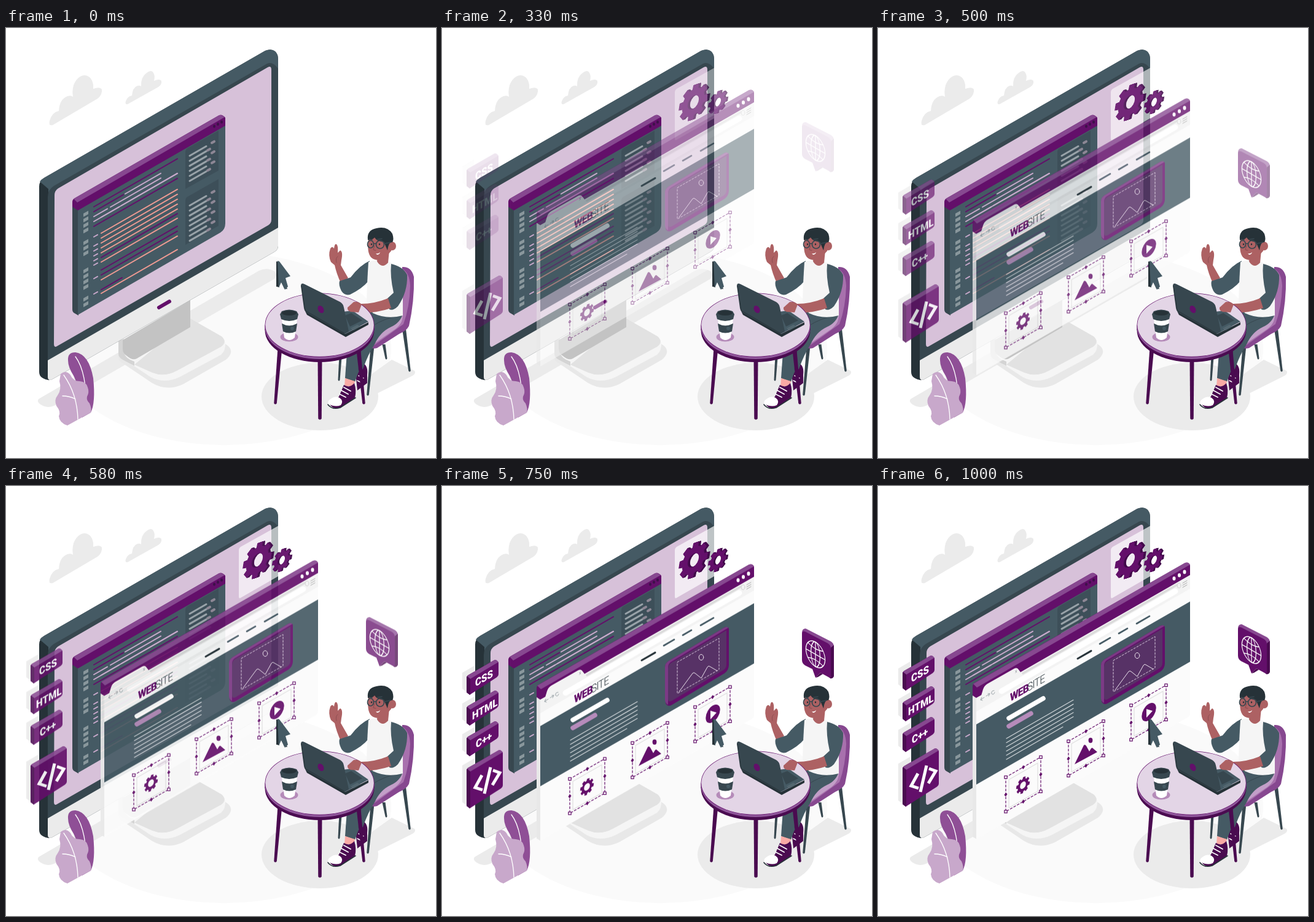
Recreate the animation shown at these times as an HTML page with a canvas. Size 700 by 700 pixels, loop 1040 ms.

```html
<!DOCTYPE html>
<html lang="en">
<head>
<meta charset="utf-8">
<title>Building a website</title>
<style>
html, body { margin: 0; width: 100%; height: 100%; overflow: hidden; background: #fff; }
canvas { display: block; width: 700px; height: 700px; }
</style>
</head>
<body>
<canvas id="stage"></canvas>
<script>
const SIZE = 700, LOOP = 1040, STEP = 41.6;
const DPR = window.devicePixelRatio || 1;
const PLUM = '#630f6a', DEEP = '#4a0b50', MAUVE = '#874890', LILAC = '#c8a8cb', PALE = '#d7c1d9';
const SLATE = '#455a64', DARK = '#37474f', INK = '#263238', MIST = '#ebebeb', SKIN = '#ad6163', CREASE = '#874a4f';
const SLOPE = 0.575;
let g;

function setup(canvas) {
  canvas.width = canvas.height = SIZE * DPR;
  const c = canvas.getContext('2d');
  c.scale(DPR, DPR);
  c.lineCap = c.lineJoin = 'round';
  return c;
}

function layer(draw) {
  const canvas = document.createElement('canvas');
  g = setup(canvas);
  draw();
  return canvas;
}

function fill(color, path) {
  g.fillStyle = color;
  g.fill(new Path2D(path));
}

function stroke(color, width, path, dash = []) {
  g.strokeStyle = color;
  g.lineWidth = width;
  g.setLineDash(dash);
  g.stroke(new Path2D(path));
  g.setLineDash([]);
}

// Line running up along the isometric axis
function bar(x, y, dx, width, color) {
  stroke(color, width, `M${x} ${y}L${x + dx} ${y - dx * SLOPE}`);
}

// Tapered furniture leg
function leg(color, x1, y1, w1, x2, y2, w2) {
  fill(color, `M${x1 - w1 / 2} ${y1}H${x1 + w1 / 2}L${x2 + w2 / 2} ${y2}Q${x2} ${y2 + 3} ${x2 - w2 / 2} ${y2}Z`);
}

function oval(color, x, y, rx, ry, width) {
  g.beginPath();
  g.ellipse(x, y, rx, ry, 0, 0, 7);
  g.fillStyle = g.strokeStyle = color;
  g.lineWidth = width || 1;
  width ? g.stroke() : g.fill();
}

function iso(x, y, draw, dir = -1) {
  g.save();
  g.transform(0.866, 0.5 * dir, 0, 1, x, y);
  draw();
  g.restore();
}

function gear(x, y, r, teeth, hole, color) {
  iso(x, y, () => {
    g.beginPath();
    for (let i = 0; i < teeth; i++) {
      [[-0.34, 0.77], [-0.24, 1], [0.24, 1], [0.34, 0.77]].forEach(([a, k]) => {
        const q = (i + a) / teeth * Math.PI * 2 + 0.2;
        g.lineTo(Math.cos(q) * r * k, Math.sin(q) * r * k);
      });
    }
    g.closePath();
    g.moveTo(hole, 0);
    g.arc(0, 0, hole, 0, 7);
    g.fillStyle = color;
    g.fill('evenodd');
  });
}

function solidGear(x, y, r, hole, depth) {
  for (let d = depth; d > 0; d -= 0.5) gear(x + d, y - d * 0.3, r, 8, hole, '#430b4c');
  gear(x, y, r, 8, hole, PLUM);
}

function text(str, x, y, size, weight, color, gap = 0) {
  iso(x, y, () => {
    g.font = `${weight} ${size}px Roboto, Arial, sans-serif`;
    g.letterSpacing = gap + 'px';
    g.fillStyle = color;
    g.fillText(str, 0, 0);
  });
}

/* ---- scenery ---- */

function drawFloor() {
  g.fillStyle = '#fff';
  g.fillRect(0, 0, SIZE, SIZE);
  oval('#fafafa', 355, 522, 272, 157);
  fill(MIST, 'M76 158Q69 160 71 151Q75 137 86 135Q87 116 100 111Q106 109 109 112Q106 92 118 81Q128 73 137 81Q143 88 142 99Q153 95 156 100Q157 109 149 115Z');
  fill(MIST, 'M198 124Q193 125 195 119Q198 111 205 110Q206 97 214 94Q218 93 220 95Q219 80 229 73Q237 67 240 73Q243 78 241 86Q250 82 253 86Q254 92 248 96Z');
  fill(MIST, 'M53 604L412 395Q425 389 437 396Q444 402 436 409L78 615Q66 620 55 612Q50 608 53 604');
  oval(MIST, 511, 600, 95, 55);
  fill(MIST, 'M560 590L600 560L628 540L665 558Q668 562 662 566L598 598Z');
}

function drawStand() {
  fill('#e8e8e8', 'M183 508V535Q183 541 189 545L238 578Q262 592 288 580L358 540Q372 528 362 518L330 495Z');
  fill('#f5f5f5', 'M190 510V538L235 568Q258 580 283 568L350 532Q358 525 357 512L300 480Z');
  fill('#e2e2e2', 'M209 548L238 561Q258 569 278 558L350 519Q361 511 351 502L300 473Z');
  fill('#d4d4d4', 'M183 510L192 506V528Q194 538 209 543V550L190 540Q183 536 183 530Z');
  fill('#c3c3c3', 'M190 508L300 443V487L213 538Q206 542 197 534Q190 530 190 522Z');
}

function drawMonitor() {
  fill(INK, 'M54 258Q54 249 62 244L422 37Q432 33 438 38Q443 42 443 52V355Q443 361 436 365L75 572Q68 575 60 570Q54 567 54 560Z');
  fill(SLATE, 'M55 250Q58 246 62 244L422 37Q432 33 438 38Q443 42 443 52V70L69 282V262Z');
  fill(DARK, 'M68 275Q68 263 78 257L425 58Q434 54 443 66V340L68 556Z');
  fill(PALE, 'M79 272Q79 265 85 261L426 64Q432 61 432 68V312Q432 318 427 321L83 518Q78 521 78 514Z');
  fill(MIST, 'M68 541L443 325V355Q443 361 436 365L75 572Q68 575 68 568Z');
  bar(249, 455, 17, 6, PLUM);
}

function drawCode() {
  fill(DARK, 'M108 288L118 296V468L111 464Q108 462 108 458Z');
  fill(SLATE, 'M117 296L357 158V318Q357 328 349 333L117 467Z');
  fill(PLUM, 'M108 283Q108 279 112 277L347 142Q352 140 357 146V159L117 297L108 291Z');
  fill(MAUVE, 'M110 278L347 142Q351 141 356 145L116 284Z');
  [339, 345, 351].forEach((x, i) => oval('#3c1148', x, 160 - i * 3.5, 2, 2.6));

  fill('#3d4f59', 'M292 201Q292 198 295 196L346 167V232L292 262Z');
  fill('#3d4f59', 'M292 280Q292 277 295 275L346 246V322L292 353Z');
  const list = (y, n) => {
    for (let i = 0; i < n; i++) {
      bar(299, y + i * 8.2, 27, 3, '#98a2a8');
      bar(i % 2 ? 328 : 335, y - (i % 2 ? 17 : 21) + i * 8.2, 4, 4, '#8d8795');
    }
  };
  list(208, 6);
  list(289, 8);

  [302, 311, 320, 329, 348, 357, 366, 394, 403, 412, 421, 440, 449].forEach(y =>
    fill('#89979c', `M126 ${y}L134 ${y - 4.6}V${y + 1}L126 ${y + 5.5}Z`));

  bar(143, 291, 136, 2, PLUM);
  bar(143, 299, 48, 2, PLUM);
  bar(194, 270, 58, 2, LILAC);
  bar(143, 307, 22, 2, LILAC);
  bar(170, 291.5, 82, 2, LILAC);
  bar(143, 315, 41, 2, LILAC);
  bar(188, 289, 91, 2, LILAC);
  bar(155, 308, 124, 2, LILAC);
  bar(143, 323, 136, 2, PLUM);

  const pink = '#ef9a92';
  [334, 342, 350, 358, 366, 381, 410, 432].forEach(y => bar(155, y, 124, 2, pink));
  [373.5, 394, 402].forEach(y => bar(155, y, 124, 2, PLUM));
  bar(155, 426, 34, 2, PLUM);
  [340, 355, 363, 371, 379, 386, 408, 433].forEach(y => bar(143, y, 6, 2, LILAC));
}

/* ---- floating parts ---- */

function drawGears() {
  fill('rgba(255,255,255,.68)', 'M379 105Q379 101 382 99L443 65V147L382 182Q379 184 379 180Z');
  solidGear(409, 121, 27.5, 10.5, 4);
  solidGear(448, 121, 17.5, 7, 3);
}

function frameBox(x, y) {
  const w = 57, h = 56, d = w * SLOPE;
  stroke('#e0e0e0', 1.2, `M${x + 5} ${y + 4}L${x + 52} ${y - 23}v46L${x + 5} ${y + 50}Z`);
  stroke(PLUM, 1.2, `M${x} ${y}l${w} ${-d}v${h}l${-w} ${d}Z`, [3.5, 3]);
  [[0, 0], [w, -d], [w, h - d], [0, h]].forEach(([a, b]) => {
    g.fillStyle = '#fff';
    g.fillRect(x + a - 2.2, y + b - 2.2, 4.4, 4.4);
    g.strokeStyle = PLUM;
    g.strokeRect(x + a - 2.2, y + b - 2.2, 4.4, 4.4);
  });
  [[w / 2, -d / 2], [w, h / 2 - d], [w / 2, h - d / 2], [0, h / 2]].forEach(([a, b]) =>
    fill(PLUM, `M${x + a - 2.6} ${y + b + 1}l2.6 -4 2.6 2.4 -2.6 4Z`));
}

function drawSite() {
  fill('#e8e8e8', 'M154 336L161 342V575L154 571Z');
  fill('#fbfbfb', 'M160 343L508 146V371Q508 374 505 376L160 575Z');
  fill(SLATE, 'M160 388L508 188V286L160 486Z');
  fill(PLUM, 'M154 327Q154 322 158 320L500 125Q506 123 508 129V145L160 345L154 341Z');
  fill(MAUVE, 'M155 322L500 125Q505 124 508 128L161 328Z');
  fill('#f3f3f3', 'M160 345L168 341L171 331Q173 325 178 322L222 297Q227 295 229 299L232 303L508 145V167L160 367Z');
  bar(201, 334, 283, 9, '#fff');
  bar(236, 305, 250, 3.5, '#dcdcdc');
  [482, 490.5, 499].forEach((x, i) => oval('#fff', x, 150.5 - i * 5.3, 2.5, 3.3));
  text('x', 223, 305, 8, 400, '#8d979c');
  stroke('#9aa3a8', 1, 'M173 344L167 348M169 344L167 348L170 349M176 342L182 338M179 338L182 338L180 342');
  stroke('#9aa3a8', 1, 'M189 333Q184 333 185 338Q188 341 190 336');
  oval('#d2d2d2', 490, 162, 3, 4, 1);
  for (let i = 0; i < 3; i++) bar(496, 158 + i * 3.5, 7, 1, '#aaa');

  text('WEB', 215, 351, 18, 900, PLUM, -0.9);
  text('SITE', 243, 335, 18, 300, INK, -0.9);
  bar(325, 281, 22, 3, INK);
  bar(361, 257, 17, 2.6, SLATE);
  bar(392, 240, 14, 2.6, SLATE);
  bar(421, 224, 21, 2.6, SLATE);

  bar(213, 378, 56, 7.5, '#fff');
  bar(213, 391, 36, 7.5, '#b68bbb');
  for (let i = 0; i < 6; i++) bar(209, 411 + i * 6.8, i < 5 ? 109 : 92, 1.2, '#d5dadd');

  fill(PLUM, 'M363 293Q363 286 369 282L459 228Q464 225 467 229V288Q467 297 460 302L375 353Q368 358 364 351Z');
  fill('#7c3a85', 'M363 292Q363 286 369 282L459 228Q464 225 466 228L372 284Q368 287 368 293V353Q364 352 363 346Z');
  fill('#573266', 'M368 294Q368 288 373 285L463 232V288Q463 294 458 297L374 347Q368 350 368 344Z');
  stroke('#d9c9dd', 1, 'M383 284L451 245V296L383 335Z', [3, 2.5]);
  oval('#f0e8f1', 422, 276, 3.8, 4.6, 1);
  stroke('#f0e8f1', 1, 'M386 332L408 302Q410 300 412 302L422 310L432 292Q434 289 436 291L448 298');

  [0, 1, 2].forEach(i => frameBox(208 + i * 102, 474 - i * 58.5));
  gear(236, 487, 13, 8, 5.5, PLUM);
  fill(PLUM, 'M320 453L335 422Q337 420 339 423L344 432L347 427Q349 425 351 428L357 433Z');
  oval(PLUM, 346, 414, 3.4, 4.2);
  iso(441, 368, () => oval(PLUM, 0, 0, 13.5, 13.5));
  fill('#fff', 'M437 363L447 366L437 377Z');
}

function tag(y, h, w) {
  const r = 40 + w, top = y - (w - 6) * SLOPE;
  fill(MIST, `M33 ${y - 6}L52 ${y - 17}V${y + h - 6}L40 ${y + h + 2}L33 ${y + h - 3}Z`);
  fill(PLUM, `M40 ${y + 2}Q40 ${y - 1} 44 ${y - 3}L${r - 7} ${top}Q${r - 4} ${top - 2} ${r} ${top + 4}V${top + h}Q${r} ${top + h + 3} ${r - 3} ${top + h + 5}L45 ${y + h + 7}L40 ${y + h + 3}Z`);
  fill(MAUVE, `M41 ${y - 1}L${r - 7} ${top}Q${r - 4} ${top - 2} ${r} ${top + 3}L46 ${y + 4}Z`);
  fill(DEEP, `M40 ${y}L46 ${y + 4}V${y + h + 7}L40 ${y + h + 3}Z`);
}

function drawTags() {
  ['CSS', 'HTML', 'C++'].forEach((name, i) => {
    tag(303 + i * 50, 23, 52);
    text(name, [54, 49, 55][i], [320, 374, 420][i], 17.5, 900, '#fff');
  });
}

function drawBracket() {
  tag(458, 57, 59);
  g.lineCap = 'butt';
  g.lineJoin = 'miter';
  stroke('#fff', 5, 'M65 468L54 488L66 492M83 460L94 464L82 484M79 455L69 498');
}

function drawGlobe() {
  fill(MAUVE, 'M586 232Q586 225 592 225L633 246Q638 249 638 255V302Q637 307 632 306L600 280Z');
  fill(PLUM, 'M586 234Q586 228 591 230L628 249Q633 252 633 258V302Q633 307 629 304L616 297L608 305L603 291L591 285Q586 282 586 276Z');
  fill(DEEP, 'M633 256L638 252V302Q637 307 631 306Q633 305 633 301ZM608 305L616 297L620 299L612 304Z');
  iso(608, 267, () => {
    oval('#fff', 0, 0, 18, 20, 1.4);
    oval('#fff', 0, 0, 8.5, 20, 1.4);
    stroke('#fff', 1.4, 'M-18 0H18M0 -20V20M-14 -12Q0 -6 14 -12M-14 12Q0 6 14 12');
  }, 1);
}

/* ---- foreground ---- */

function drawPlant() {
  fill('#8f4f96', 'M101 541Q100 528 113 528Q135 531 142 570Q146 610 138 626L124 634Q122 590 110 566Q101 552 101 541Z');
  stroke('#fff', 1.3, 'M113 535Q132 560 131 626');
  fill(LILAC, 'M89 563Q98 556 105 565Q109 575 120 575Q131 576 133 585Q136 593 132 600Q130 605 136 611Q140 620 138 626L100 647Q87 643 86 632Q90 625 82 615Q78 605 84 598Q91 588 87 575Z');
  stroke('#fff', 1.3, 'M94 565Q116 596 117 637M92 599Q103 599 113 604');
}

function drawChair() {
  leg(DARK, 546, 512, 5, 542, 573, 3);
  leg(DARK, 615, 515, 5, 619, 538, 3);
  leg(DARK, 648, 490, 6, 657, 558, 3.5);
  leg(DARK, 597, 513, 6, 589, 597, 3.5);
  fill(MAUVE, 'M645 389Q660 388 664 405Q665 445 656 485Q652 493 640 498L604 521Q592 524 588 514L600 495L640 470Z');
  fill('#a871ad', 'M645 392Q657 398 658 420Q657 455 647 482L600 516Q590 518 590 508L640 465Z');
  fill('#c39fc8', 'M590 509L645 462Q649 478 634 490L602 512Q594 516 590 509Z');
}

function drawMan() {
  // legs and shoes
  fill(DEEP, 'M569 562L580 545Q590 549 588 565V578L572 590Z');
  stroke('#fff', 1.5, 'M574 566L582 570M572 574L580 578');
  fill(SLATE, 'M594 460L646 465Q642 480 626 487Q609 495 600 515Q590 530 581 555L572 562L556 535L560 495Z');
  fill(SLATE, 'M555 528L552 570L568 576L584 532Z');
  stroke(DARK, 1, 'M630 470Q604 478 587 492Q576 520 574 556');
  fill('#f9aaa5', 'M552 570L568 575L566 583L551 583Z');
  fill(DEEP, 'M550 581Q560 587 567 578Q571 590 568 602L545 618Q532 622 527 612L542 600Z');
  fill('#fff', 'M527 605Q536 598 543 602Q550 607 545 614Q536 618 525 612Q523 608 527 605Z');
  stroke(INK, 1.6, 'M524 613Q531 622 544 618L569 602');
  stroke('#fff', 1.8, 'M543 596L553 601M546 590L557 596M550 585L561 591');

  // raised arm
  fill(SKIN, 'M529 381Q524 370 528 359Q531 354 534 359Q535 350 538 352Q541 354 540 366L544 362Q549 364 546 378L545 386L557 407L545 415Q538 400 535 386Z');
  stroke(CREASE, 0.8, 'M538 382Q536 374 540 372');
  fill(SLATE, 'M592 379Q576 386 561 406L543 412Q541 418 546 428Q551 436 560 434Q580 424 589 413Z');

  // torso and neck
  fill('#f5f5f5', 'M590 381Q607 374 631 384L646 400L646 468Q620 475 597 464L587 445Q588 410 590 381Z');
  fill(SKIN, 'M605 370L624 362L622 382Q612 393 604 380Z');
  fill(SLATE, 'M627 384Q646 388 653 402Q654 430 638 453Q630 461 624 458L620 441L631 431Q625 405 627 384Z');
  fill(SKIN, 'M622 440L627 456Q600 465 575 463L561 462Q553 459 557 453L565 446Q570 443 578 449Q600 449 622 440Z');
  stroke(CREASE, 0.8, 'M570 452L562 453M572 459L562 459');

  // head
  fill(SKIN, 'M590 342Q587 367 595 374Q604 381 616 375L627 363Q633 345 624 336Z');
  oval(SKIN, 629, 355, 6, 7);
  fill(INK, 'M589 345Q587 329 603 326Q621 322 629 335Q632 344 629 349Q623 347 621 362L615 348Q604 348 600 341Q596 346 589 345Z');
  oval(DARK, 593.5, 352, 5, 6, 1.7);
  oval(DARK, 609, 352.5, 6.5, 6.5, 1.7);
  stroke(DARK, 1.5, 'M599 351H602M616 351L626 349M591 344L596 345M605 344L612 343');
  oval(INK, 595, 352, 1.2, 1.6);
  oval(INK, 608, 352, 1.2, 1.6);
  stroke(CREASE, 1, 'M600 354L598 361L602 362');
  fill('#fff', 'M602 367Q606 368 609 365Q608 369 604 369Z');
}

function drawTable() {
  leg(DEEP, 446, 520, 7, 438.5, 611, 4.5);
  leg(DEEP, 574, 525, 7, 582.5, 611, 4.5);
  leg(DEEP, 511, 538, 7, 511, 636, 5.5);
  oval(DEEP, 510.5, 492, 89, 52);
  g.fillStyle = DEEP;
  g.fillRect(421.5, 484, 178, 8);
  oval('#8f569a', 510.5, 487, 89, 52);
  oval(PLUM, 510.5, 483.5, 89, 52);
  oval('#e3d5e6', 510.5, 483.5, 88.3, 51.3);

  // cup
  oval('#b58bb9', 461, 503, 14.5, 7.5);
  fill('#fff', 'M449 474L453 504Q461 512 470 504L474 474Z');
  fill(DARK, 'M449 481Q461 488 474 481L472 494Q461 499 451 494Z');
  oval(SLATE, 466, 489, 3, 3);
  fill(DARK, 'M446 466L449 461Q461 456 473 461L476 466L474 474Q461 480 448 474Z');
  oval(INK, 461, 464, 12, 4);
}

function drawLaptop() {
  fill(INK, 'M487 461L552 498L590 479V483L553 503L490 467Z');
  fill(SLATE, 'M548 462L564 460L590 478L552 498Z');
  fill(DARK, 'M552 468L562 464L580 476L560 486Z');
  fill('#546770', 'M561 489L572 483L577 486L566 492Z');
  fill(DARK, 'M480 420Q480 414 486 417L544 446Q549 449 550 455L558 494L551 498L489 463Q486 461 485 456Z');
  stroke(INK, 1, 'M481 420L487 460L551 497');
  g.save();
  g.translate(512.5, 458);
  g.rotate(-0.5);
  oval(PLUM, 0, 0, 4.5, 6.5);
  g.restore();
  fill(SKIN, 'M556 455L566 446Q572 445 579 450L574 463L561 462Q555 460 556 455Z');
}

function drawCursor() {
  fill(INK, 'M440 380L445 381V422L440 421ZM448 413L453 424L458 425L452 412Z');
  fill(SLATE, 'M442 379L445 380L463 404L455 407L459 421L454 426L448 414L444 423Z');
}

const back = layer(() => { drawFloor(); drawStand(); drawMonitor(); drawCode(); });
const gears = layer(drawGears);
const site = layer(drawSite);
const bracket = layer(drawBracket);
const tags = layer(drawTags);
const globe = layer(drawGlobe);
const front = layer(() => { drawPlant(); drawChair(); drawMan(); drawTable(); drawLaptop(); drawCursor(); });

/* ---- motion ---- */

const TIMES = [0, 170, 330, 420, 580, 750, 1000];
const NEAR = [-49, -36.5, -24.2, -16.7, -3.5, 2.8, 0];
const FAR = [-130, -112, -72.5, -49, -12, 7, 0];
const SITE_FADE = [0, 0.12, 0.46, 0.63, 0.91, 1, 1];
const GEAR_FADE = [0, 0.19, 0.6, 0.76, 0.95, 1, 1];
const TAG_FADE = [0, 0, 0.13, 0.38, 0.86, 1, 1];
const GLOBE_FADE = [0, 0, 0.09, 0.25, 0.74, 1, 1];

// Smooth curve through the given values
function curve(v, t) {
  const last = TIMES.length - 1;
  let i = 0;
  while (i < last - 1 && t > TIMES[i + 1]) i++;
  const slope = k => {
    const a = Math.max(k - 1, 0), b = Math.min(k + 1, last);
    return (v[b] - v[a]) / (TIMES[b] - TIMES[a]);
  };
  const d = TIMES[i + 1] - TIMES[i], u = Math.min((t - TIMES[i]) / d, 1), w = 1 - u;
  return v[i] * w * w * (1 + 2 * u) + v[i + 1] * u * u * (3 - 2 * u)
    + d * u * w * (slope(i) * w - slope(i + 1) * u);
}

const view = setup(document.getElementById('stage'));

function show(image, fade = 1, y = 0) {
  view.globalAlpha = Math.min(Math.max(fade, 0), 1);
  view.drawImage(image, 0, y, SIZE, SIZE);
}

function frame(now) {
  const t = Math.floor(((now % LOOP) + 4) / STEP) % 25 * STEP;
  const near = curve(NEAR, t), far = curve(FAR, t);
  const siteFade = curve(SITE_FADE, t);
  show(back);
  show(gears, curve(GEAR_FADE, t));
  show(site, siteFade, near);
  show(bracket, siteFade, near);
  show(tags, curve(TAG_FADE, t), far);
  show(globe, curve(GLOBE_FADE, t), far);
  show(front);
}

const start = performance.now();
function tick() {
  frame(performance.now() - start);
  requestAnimationFrame(tick);
}
tick();
</script>
</body>
</html>
```
